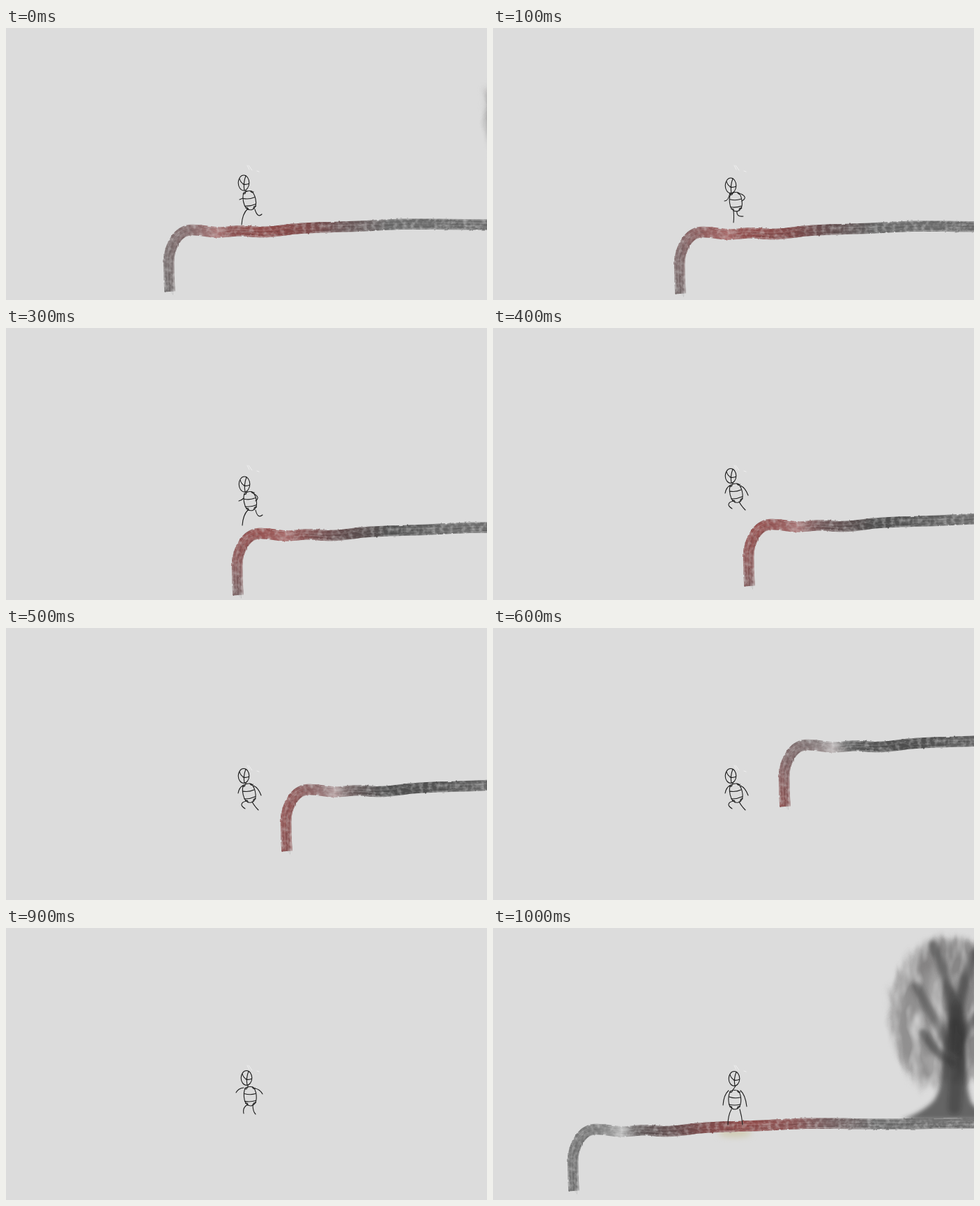
Recreate the animation shown at these times as an HTML page. Size 690 by 390 pixels, loop 1100 ms.

```html
<!DOCTYPE html>
<html lang="en">
<head>
<meta charset="utf-8">
<title>Sketch runner</title>
<style>
  html, body { margin: 0; width: 100%; height: 100%; overflow: hidden; background: #dcdcdc; }
  svg { display: block; width: 690px; height: 390px; }
  path, ellipse { stroke-linecap: round; stroke-linejoin: round; }
  #brush path { fill: none; stroke-linecap: butt; }
  #figure { fill: none; stroke: #1c1c1c; stroke-width: 1.1; }
</style>
</head>
<body>
<svg viewBox="0 0 690 390">
  <defs>
    <linearGradient id="charcoal" gradientUnits="userSpaceOnUse" x1="230" x2="830" y1="0" y2="0">
      <stop offset="0" stop-color="#777"/>
      <stop offset=".07" stop-color="#828282"/>
      <stop offset=".105" stop-color="#a0a0a0"/>
      <stop offset=".122" stop-color="#c2c2c2"/>
      <stop offset=".145" stop-color="#808080"/>
      <stop offset=".18" stop-color="#545454"/>
      <stop offset=".34" stop-color="#505050"/>
      <stop offset=".52" stop-color="#6c6c6c"/>
      <stop offset="1" stop-color="#747474"/>
    </linearGradient>
    <radialGradient id="warmth" gradientUnits="userSpaceOnUse" r="180">
      <stop offset="0" stop-color="#a04846" stop-opacity=".8"/>
      <stop offset=".35" stop-color="#a04848" stop-opacity=".6"/>
      <stop offset=".6" stop-color="#a0484c" stop-opacity=".28"/>
      <stop offset="1" stop-color="#a0484c" stop-opacity="0"/>
    </radialGradient>
    <filter id="grain" filterUnits="userSpaceOnUse" x="200" y="255" width="650" height="140" color-interpolation-filters="sRGB">
      <feTurbulence type="fractalNoise" baseFrequency=".16" numOctaves="2" seed="4" result="noise"/>
      <feDisplacementMap in="SourceGraphic" in2="noise" scale="2.5" xChannelSelector="R" yChannelSelector="G" result="rough"/>
      <feColorMatrix in="noise" values="0 0 0 0 0  0 0 0 0 0  0 0 0 0 0  0 0 0 1 .42" result="mottle"/>
      <feComposite in="rough" in2="mottle" operator="in" result="mottled"/>
      <feGaussianBlur in="mottled" stdDeviation=".45"/>
    </filter>
    <filter id="wash" filterUnits="userSpaceOnUse" x="540" y="-30" width="240" height="300" color-interpolation-filters="sRGB">
      <feGaussianBlur stdDeviation="5" result="blurred"/>
      <feTurbulence type="fractalNoise" baseFrequency=".06 .025" numOctaves="2" seed="7" result="noise"/>
      <feDisplacementMap in="blurred" in2="noise" scale="16" xChannelSelector="R" yChannelSelector="G" result="rough"/>
      <feColorMatrix in="noise" values="0 0 0 0 0  0 0 0 0 0  0 0 0 0 0  0 0 0 1.8 -.02" result="mottle"/>
      <feComposite in="rough" in2="mottle" operator="in"/>
    </filter>
    <filter id="soft" x="-30%" y="-60%" width="160%" height="220%"><feGaussianBlur stdDeviation="4.5"/></filter>
    <filter id="smudge" x="-30%" y="-30%" width="160%" height="160%"><feGaussianBlur stdDeviation="3"/></filter>
  </defs>

  <ellipse id="glow" cx="347" cy="294" rx="24" ry="6" fill="#d0ccb4" filter="url(#soft)"/>
  <g id="ground">
    <g transform="translate(119 1)" fill="none">
      <g filter="url(#wash)" stroke="#6a6868">
        <path d="M650 12C608 16 570 62 569 112C570 165 588 208 620 234C640 215 690 225 735 205C770 130 745 20 650 12Z" fill="#777575" fill-opacity=".55" stroke="none"/>
        <path d="M636 30C606 52 588 92 590 130S604 190 618 208" stroke-width="18" opacity=".35"/>
        <path d="M622 50C606 85 610 135 626 175M645 30Q680 20 720 45" stroke-width="22" opacity=".35"/>
        <path d="M664 50V190M695 60V180" stroke-width="38" opacity=".5"/>
      </g>
      <g filter="url(#smudge)" stroke="#383838">
        <path d="M661 85C652 130 647 165 645 195Q643 240 628 252Q612 266 586 275H735Q698 266 686 250C677 225 678 185 680 150Q676 115 661 85Z" fill="#383838" fill-opacity=".72" stroke="none"/>
        <path d="M631 24Q646 55 653 90T663 175" stroke-width="13" opacity=".6"/>
        <path d="M692 36Q674 75 669 115V180" stroke-width="14" opacity=".6"/>
        <path d="M608 84Q622 112 634 132T654 174" stroke-width="13" opacity=".45"/>
        <path d="M617 150Q634 180 660 194M694 125Q678 148 668 172" stroke-width="12" opacity=".55"/>
        <path d="M663 140Q667 200 662 258" stroke-width="20" opacity=".45"/>
      </g>
    </g>
    <g id="brush" filter="url(#grain)"></g>
  </g>
  <path d="M346 197L349 203M348 197L353 204M360 205L363 206" stroke="#f0f0f0" fill="none"/>
  <g id="figure"></g>
</svg>
<script>
const byId = id => document.getElementById(id);
const ground = byId('ground'), warmth = byId('warmth'), glow = byId('glow'), figure = byId('figure');

const track = 'M235 378C234 360 233 343 234 328C237 308 248 290 266 289.5C281 289 290 293 304 293' +
  'S335 289 350 291.5S385 292 405 289S470 285.5 500 284.5S555 281 580 281S640 282 690 282S780 280 830 281';

// Parallel bristles: a diagonal shift follows both the post and the beam.
function paintBrush() {
  let seed = 11;
  const random = () => (seed = seed * 16807 % 2147483647) / 2147483647;
  const line = (stroke, width, extra = '') => `<path d="${track}" stroke="${stroke}" stroke-width="${width}" ${extra}/>`;
  let out = line('url(#charcoal)', 15.5) + line('url(#warmth)', 15.5);
  for (let shift = -7.5; shift <= 7.5; shift += 1) {
    const dash = Array.from({ length: 6 }, () => (20 + random() * 90).toFixed(0)).join(' ');
    const edge = Math.abs(shift) > 6;
    const alpha = (edge ? .3 : .06 + random() * .12).toFixed(2);
    const tone = edge || random() < .45 ? '#dcdcdc' : '#222';
    out += line(tone, 1.1, `opacity="${alpha}" stroke-dasharray="${dash}" transform="translate(${shift} ${shift})"`);
  }
  byId('brush').innerHTML = out;
}

// head: x, y, ry; body: x, y, tilt; limbs: hand-drawn strokes
const run = {
  head: [341, 222, 11], body: [349, 247, -10],
  limbs: 'M340 244L335 246M347 259Q339 266 338 282M357 260Q361 273 367 267'
};
const stride = {
  head: [342, 224, 11], body: [350, 248, -9],
  limbs: 'M341 244Q338 247 334 248M356 238Q365 243 358 248M347 261Q340 268 339 283M358 261Q361 274 368 268'
};
const pass = {
  head: [341, 226, 11], body: [348, 249, -5],
  limbs: 'M340 236Q338 248 332 248M356 238Q366 243 357 248M345 262Q346 270 345 279M350 263Q349 271 359 270'
};
const leap = {
  head: [341, 212, 10.5], body: [348.5, 236.5, -11],
  limbs: 'M341 225Q334 229 333 237M355 226Q362 229 366 240M345 248C336 250 336 255 343 259M353 249Q356 255 362 261'
};
const fall = {
  head: [345, 215, 10.5], body: [350, 241, -3],
  limbs: 'M341 229Q333 230 330 236M357 230Q364 231 368 238M347 253Q339 257 341 266M354 253Q354 263 358 267'
};
const stand = {
  head: [346, 216, 10.5], body: [346.5, 246, 0],
  limbs: 'M338 233Q331 239 330 254M355 233Q362 239 364 256M342 260Q337 269 337 282M354 260Q357 270 358 282'
};

// pose, then ground shift x, y (none: ground is out of view)
const steps = [
  [run, 0, 0], [pass, 34, 3], [pass, 66, 4], [stride, 98, 5], [leap, 133, -8], [leap, 168, -58],
  [leap, 184, -122], [leap, 189, -207], [fall], [fall], [stand, -119, -1]
];

function drawFigure({ head: [hx, hy, ry], body: [bx, by, tilt], limbs }) {
  figure.innerHTML = `
    <g transform="translate(${hx} ${hy})">
      <ellipse rx="7.8" ry="${ry}"/>
      <path d="M3-${ry - 1}Q-1 0 1 ${ry}M-1 2Q4 3 7.5 1M-6-6Q-5-1 0 2"/>
    </g>
    <path d="M${hx + 2} ${hy + ry}L${bx - 3} ${by - 13}"/>
    <g transform="translate(${bx} ${by}) rotate(${tilt})">
      <path d="M-6-12Q0-15 6-12Q10-5 9 4Q8 13 1 14Q-6 14-8 6Q-10-5-6-12Z"/>
      <path d="M-8-4Q0-1 8-3M-8 7Q0 9 8 7"/>
      <path d="M-7 10Q-3 9-4 13M4 13Q4 9 8 10M-7-11Q-4-9-3-13M4-13Q5-9 8-11"/>
    </g>
    <path d="${limbs}"/>`;
}

let shown = -1;
function render(time) {
  const index = Math.floor(time % 1100 / 100);
  if (index === shown) return;
  shown = index;
  const [pose, x, y] = steps[index];
  const visible = x !== undefined;
  ground.style.display = visible ? '' : 'none';
  if (visible) {
    ground.setAttribute('transform', `translate(${x} ${y})`);
    // The red light stays with the runner while the ground slides.
    warmth.setAttribute('cx', 368 - x);
    warmth.setAttribute('cy', 280 - y);
  }
  glow.style.display = pose === stand ? '' : 'none';
  drawFigure(pose);
}

function tick() {
  render(performance.now());
  requestAnimationFrame(tick);
}

paintBrush();
tick();
</script>
</body>
</html>
```
